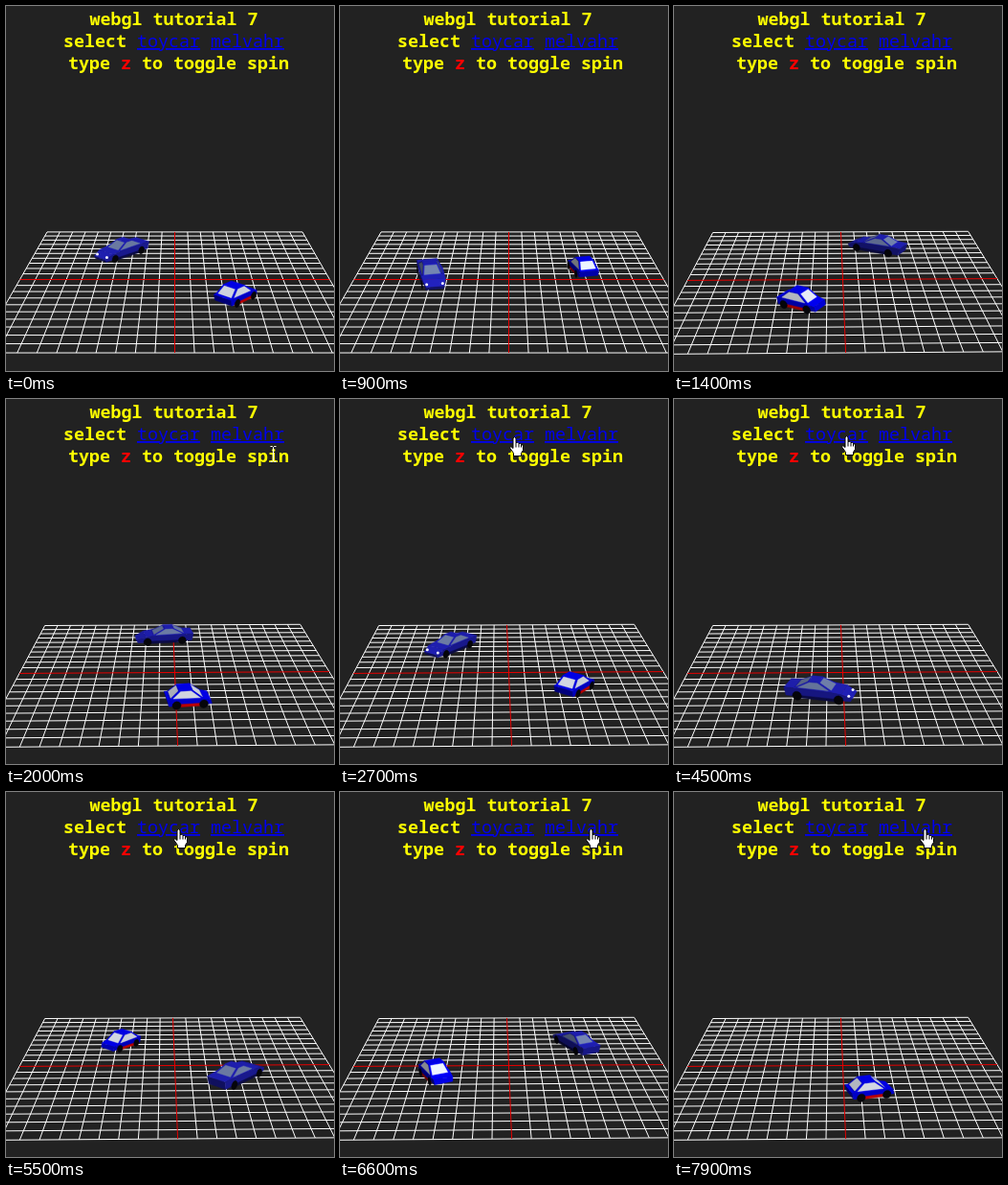
Recreate the animation shown at these times as an HTML page with a canvas. Size 343 by 381 pixels, loop 8 s.

```html
<!DOCTYPE html>
<html lang="en">
<head>
<meta charset="utf-8">
<title>webgl tutorial 7</title>
<style>
html, body { margin: 0; width: 100%; height: 100%; overflow: hidden; background: #222; }
svg, canvas { position: absolute; left: 0; top: 0; }
text { font: 600 18.33px "Noto Sans Mono", monospace; fill: #ff0; }
.link { fill: #00e; text-decoration: underline; font-weight: 400; }
.link.pressed, .key { fill: #f00; }
</style>
</head>
<body>
<svg width="343" height="381">
  <text x="87.5" y="20">webgl tutorial 7</text>
  <text x="60" y="43">select <tspan class="link" id="toyLink">toycar</tspan> <tspan class="link" id="sportLink">melvahr</tspan></text>
  <text x="65" y="66">type <tspan class="key">z</tspan> to toggle spin</text>
</svg>
<canvas id="stage" width="343" height="381"></canvas>
<script>
const ctx = document.getElementById('stage').getContext('2d');
const toyLink = document.getElementById('toyLink');
const sportLink = document.getElementById('sportLink');

// Profile points run from rear bottom over the top to the front: [forward, height, half width]
const toy = {
  lift: .005, paint: [0, 0, 250], glass: [232, 238, 250], wheels: [-.078, .078], radius: .025, trim: [235, 0, 0],
  body: [[-.12, .018, .064], [-.13, .058, .064], [.04, .062, .07], [.12, .046, .062], [.128, .018, .058]],
  cabin: [[-.115, .058, .062], [-.06, .105, .05], [.015, .105, .05], [.08, .054, .062]]
};
const sport = {
  lift: .04, paint: [34, 34, 190], glass: [115, 132, 175], wheels: [-.12, .125], radius: .027, trim: [16, 16, 90], lamps: true,
  body: [[-.19, .02, .062], [-.2, .07, .066], [0, .078, .075], [.14, .062, .072], [.2, .036, .055], [.19, .018, .055]],
  cabin: [[-.14, .071, .062], [-.06, .11, .046], [0, .11, .046], [.085, .068, .062]]
};
const light = [.25, .79, .56];
let yaw = 0;

// World: x right, h up, z towards the viewer; the grid spans -1..1
function project([x, h, z]) {
  const c = Math.cos(yaw), n = Math.sin(yaw);
  const u = x * c + z * n, v = z * c - x * n;
  const s = 162 / (1 - .2135 * v - .0854 * h);
  return [176.5 + u * s, 285.5 - s * (.928 * h - .3716 * v)];
}

function line(a, b, color) {
  ctx.strokeStyle = color;
  ctx.beginPath();
  ctx.moveTo(...project(a));
  ctx.lineTo(...project(b));
  ctx.stroke();
}

function drawGrid() {
  ctx.lineWidth = 1;
  for (let i = -10; i <= 10; i++) {
    if (!i) continue;
    const p = i / 10;
    line([p, 0, -1], [p, 0, 1], '#fff');
    line([-1, 0, p], [1, 0, p], '#fff');
  }
  line([0, 0, -1], [0, 0, 1], '#e60000');
  line([-1, 0, 0], [1, 0, 0], '#e60000');
}

function shade(pts, color) {
  const [a, b, c] = pts;
  const p = c.map((v, i) => v - a[i]), q = b.map((v, i) => v - a[i]);
  const n = [p[1] * q[2] - p[2] * q[1], p[2] * q[0] - p[0] * q[2], p[0] * q[1] - p[1] * q[0]];
  const dot = n.reduce((sum, v, i) => sum + v * light[i], 0) / Math.hypot(...n);
  const k = .45 + .58 * Math.max(0, dot);
  return `rgb(${color.map(v => Math.min(255, v * k | 0))})`;
}

// Fills a face that turns towards the viewer; clockwise on screen means visible
function face(pts, color, glass) {
  const flat = pts.map(project);
  const area = flat.reduce((sum, [x, y], i) => {
    const [u, v] = flat[(i + 1) % flat.length];
    return sum + x * v - u * y;
  }, 0);
  if (area <= 0) return;
  ctx.fillStyle = ctx.strokeStyle = shade(pts, color);
  ctx.lineWidth = .4;
  ctx.beginPath();
  flat.forEach(p => ctx.lineTo(...p));
  ctx.closePath();
  ctx.fill();
  ctx.stroke();
  if (glass) {
    const mid = [0, 1, 2].map(i => pts.reduce((sum, p) => sum + p[i], 0) / pts.length);
    face(pts.map(p => p.map((v, i) => mid[i] + (v - mid[i]) * .8)), glass);
  }
}

function drawCar(car, angle) {
  const cx = .5 * Math.cos(angle), cz = .5 * Math.sin(angle);
  const hx = Math.sin(angle), hz = -Math.cos(angle);
  const place = (l, h, r) => [cx + l * hx - r * hz, h + car.lift, cz + l * hz + r * hx];
  const sideFace = (side, pts, color, glass) => {
    const world = pts.map(([l, h, w]) => place(l, h, side * w));
    face(side > 0 ? world : world.reverse(), color, glass);
  };
  const shell = (pts, glass) => {
    pts.forEach(([l, h, w], i) => {
      const [m, k, v] = pts[(i + 1) % pts.length];
      const quad = [place(l, h, -w), place(m, k, -v), place(m, k, v), place(l, h, w)];
      face(quad, car.paint, i % 2 ? null : glass);
    });
    for (const side of [-1, 1]) sideFace(side, pts, car.paint, glass);
  };

  shell(car.body);
  for (const side of [-1, 1]) {
    const end = car.wheels[1] + .02;
    sideFace(side, [[-end, .014, .07], [-end, .03, .07], [end, .03, .07], [end, .014, .07]], car.trim);
    for (const l of car.wheels) {
      const rim = Array.from({length: 12}, (_, i) => {
        const a = i * Math.PI / 6;
        return [l - car.radius * Math.cos(a), car.radius * (1 + Math.sin(a)), .072];
      });
      sideFace(side, rim, [8, 8, 14]);
    }
  }
  shell(car.cabin, car.glass);
  if (car.lamps && hz > .2) {
    ctx.fillStyle = '#f0f0ff';
    for (const r of [-.048, .048]) {
      const [x, y] = project(place(.178, .047, r));
      ctx.beginPath();
      ctx.arc(x, y, 1.5, 0, 7);
      ctx.fill();
    }
  }
}

const hand = new Path2D('M-1.5 12V1.5Q0-1 1.5 1.5V6Q3.5 5 4.5 7Q6.5 6 7 8Q9 7.5 9 10V14L7 17V20H-1V17L-5 11.5Q-4.5 9-1.5 12Z');
const arrow = new Path2D('M0 0V16L4 12.5L6.5 18L9 17L6.5 11.5H11.5Z');
const beam = new Path2D('M-3-8H-1L0-7L1-8H3M0-7V7M-3 8H-1L0 7L1 8H3');
const route = [[19, 306, 66], [20, 279, 57], [27, 182, 39], [28, 180, 38], [57, 180, 38], [62, 262, 38], [80, 262, 38]];

function drawCursor(tick) {
  const i = route.findIndex((stop, k) => k && tick >= route[k - 1][0] && tick < stop[0]);
  if (i < 0) return;
  const [t0, x0, y0] = route[i - 1], [t1, x1, y1] = route[i];
  const k = (tick - t0) / (t1 - t0);
  const x = x0 + (x1 - x0) * k, y = y0 + (y1 - y0) * k;
  ctx.save();
  ctx.translate(Math.round(x) + .5, Math.round(y) + .5);
  ctx.lineWidth = 1;
  if (y > 47 && x < 298) {
    ctx.strokeStyle = '#fff';
    ctx.stroke(beam);
  } else {
    const shape = y > 47 ? arrow : hand;
    ctx.fillStyle = '#fff';
    ctx.strokeStyle = '#000';
    ctx.fill(shape);
    ctx.stroke(shape);
    if (shape === hand) ctx.stroke(new Path2D('M1.5 6V11M4.5 7V11M7 8V11'));
  }
  ctx.restore();
}

function draw(tick) {
  const within = (a, b) => tick >= a && tick < b;
  const cut = tick >= 14;
  yaw = cut ? .015 : 0;
  const degrees = (cut ? 82 + 125.2 : 43) - 6.26 * tick;
  const angle = degrees * Math.PI / 180;
  const cars = [];
  if (!within(41, 55)) cars.push([toy, angle]);
  if (tick < 71) cars.push([sport, angle + Math.PI]);
  cars.sort((a, b) => Math.sin(a[1]) - Math.sin(b[1]));

  toyLink.classList.toggle('pressed', within(39, 41) || within(54, 55));
  sportLink.classList.toggle('pressed', within(69, 71));
  ctx.clearRect(0, 0, 343, 381);
  drawGrid();
  for (const [car, a] of cars) drawCar(car, a);
  drawCursor(tick);
}

function loop() {
  draw(Math.floor(performance.now() % 8000 / 100));
  requestAnimationFrame(loop);
}
loop();
</script>
</body>
</html>
```
